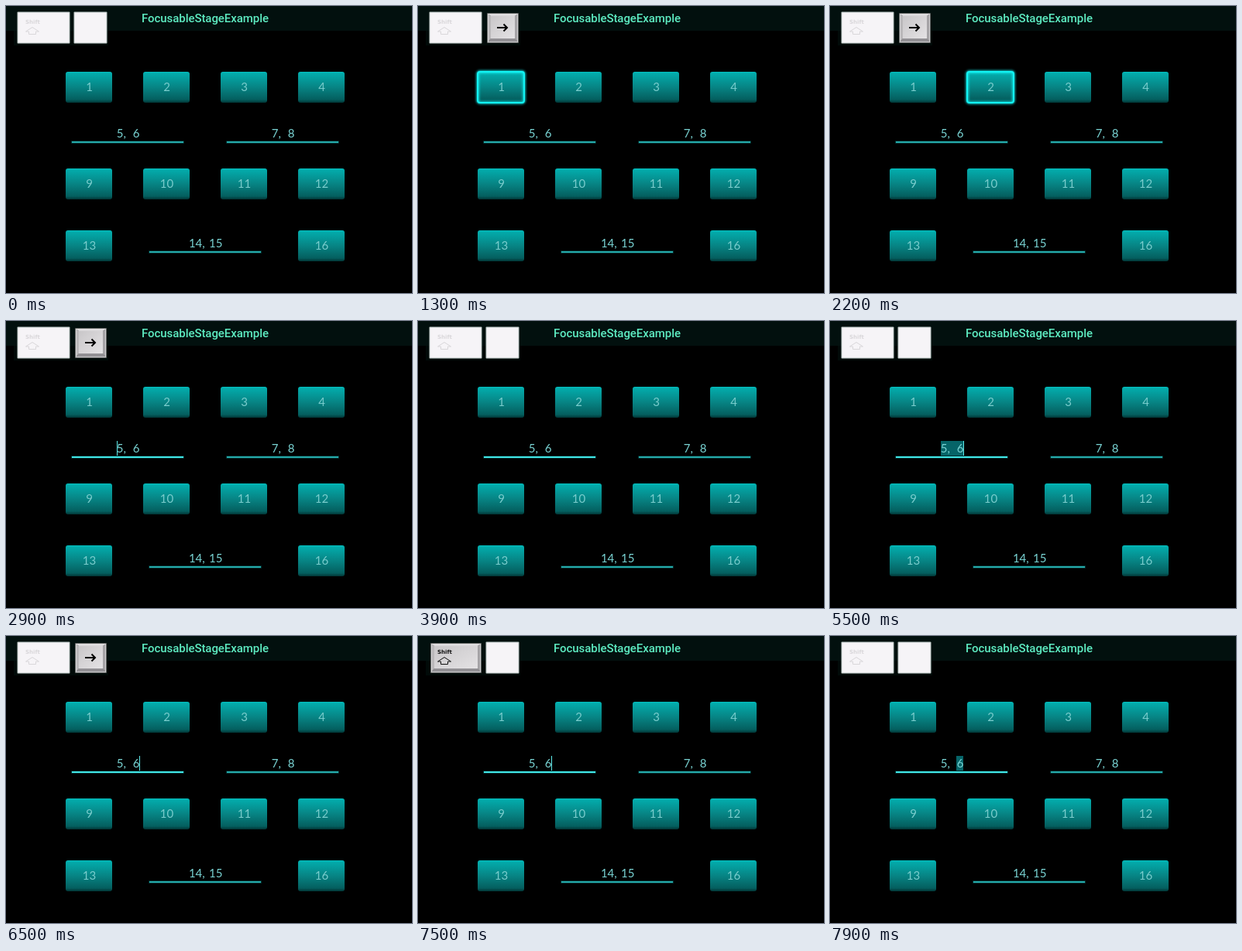
Write an HTML page that moves like this. It is 524 by 371 pixels and loops after 8 s.

```html
<!DOCTYPE html>
<html lang="en">
<head>
<meta charset="utf-8">
<title>FocusableStageExample</title>
<style>
  html, body { margin: 0; width: 100%; height: 100%; overflow: hidden; background: #000; }
  svg { display: block; }
  .title { font: 500 15px Roboto, sans-serif; fill: #5eecc2; }
  .label { font: 15px Lato, sans-serif; text-anchor: middle; }
  .shift { font: bold 7px "DejaVu Sans", sans-serif; }
</style>
</head>
<body>
<svg id="stage" width="524" height="371" viewBox="0 0 524 371">
  <defs>
    <linearGradient id="teal" x2="0" y2="1">
      <stop offset="0" stop-color="#02bcbc"/>
      <stop offset=".07" stop-color="#03a9a9"/>
      <stop offset=".5" stop-color="#078484"/>
      <stop offset=".9" stop-color="#045f5f"/>
      <stop offset="1" stop-color="#013535"/>
    </linearGradient>
    <linearGradient id="face" x2="1" y2="1">
      <stop offset="0" stop-color="#c9c7c9"/>
      <stop offset="1" stop-color="#e4e2e4"/>
    </linearGradient>
    <filter id="blur" x="-20%" y="-20%" width="140%" height="140%">
      <feGaussianBlur stdDeviation="1.8"/>
    </filter>
  </defs>
  <rect width="524" height="371"/>
  <rect width="524" height="32" fill="#02100e"/>
  <rect y="32" x="10" width="122" height="19" fill="#010a08"/>
  <text class="title" x="257" y="21" text-anchor="middle" textLength="164">FocusableStageExample</text>
</svg>
<script>
const LOOP = 8000;
const stage = document.getElementById('stage');

function add(tag, attrs, parent = stage, text = '') {
  const el = document.createElementNS('http://www.w3.org/2000/svg', tag);
  for (const k in attrs) el.setAttribute(k, attrs[k]);
  el.textContent = text;
  return parent.appendChild(el);
}
const show = (el, on) => el.setAttribute('visibility', on ? 'inherit' : 'hidden');

function button(n, x, y) {
  add('rect', { x, y, width: 60, height: 40, rx: 3, fill: 'url(#teal)' });
  const ring = add('g', { fill: 'none', stroke: '#12f4f4' });
  const box = { x, y, width: 60, height: 40, rx: 3 };
  add('rect', { ...box, 'stroke-width': 4, filter: 'url(#blur)', opacity: .75 }, ring);
  add('rect', { ...box, 'stroke-width': 2 }, ring);
  add('text', { class: 'label', x: x + 30.5, y: y + 24.5, fill: '#79cccc' }, stage, n);
  return ring;
}

function field(text, x, y, gap) {
  const mark = add('rect', { y: y - 21, height: 19, fill: '#066468' });
  add('rect', { x: x - 1, y: y - 2, width: 146, height: 4, rx: 1, fill: '#022b2b' });
  const line = add('rect', { x, y: y - 1, width: 144, height: 2 });
  add('text', { class: 'label', x: x + 72.7, y: y - 6.5, fill: '#78d2d2', style: `word-spacing:${gap}px` }, stage, text);
  const caret = add('rect', { y: y - 21, width: 1, height: 19, fill: '#5ceaea' });
  return { mark, line, caret };
}

// A key cap: pale when idle, bevelled grey while held.
function key(x, w) {
  const idle = add('g', {}), held = add('g', {});
  add('rect', { x: x - .5, y: 7.5, width: w + 1, height: 41, rx: 1, fill: '#b9c4c1' }, idle);
  add('rect', { x: x + .5, y: 8.5, width: w - 1, height: 39, fill: '#f6f4f7' }, idle);
  const l = x + 2, r = x + w - 1, t = 10, b = 47;
  add('rect', { x: l - 1, y: t - 1, width: r - l + 2, height: b - t + 2, rx: 1, fill: '#626564' }, held);
  const side = (fill, d) => add('path', { fill, d }, held);
  side('#dddbdd', `M${l} ${t}H${r}L${r - 4} ${t + 3}H${l + 4}z`);
  side('#bab8ba', `M${l} ${t}V${b}L${l + 4} ${b - 5}V${t + 3}z`);
  side('#a5a3a6', `M${r} ${t}V${b}L${r - 4} ${b - 5}V${t + 3}z`);
  side('#929094', `M${l} ${b}H${r}L${r - 4} ${b - 5}H${l + 4}z`);
  add('rect', { x: l + 4, y: t + 3, width: r - l - 8, height: b - t - 8, fill: 'url(#face)' }, held);
  add('rect', { x: l + .5, y: t + .5, width: r - l - 1, height: b - t - 1, fill: 'none', stroke: '#e2e0e2', opacity: .7 }, held);
  return { idle, held, set(on) { show(idle, !on); show(held, on); } };
}

function shiftMark(parent, ink) {
  add('text', { class: 'shift', x: 25, y: 23, fill: ink }, parent, 'Shift');
  add('path', { d: 'M34 27.5L42.5 33H38.5V36.5H29.5V33H25.5z', fill: 'none', stroke: ink }, parent);
}

const shift = key(15, 67), arrow = key(88, 42);
shiftMark(shift.idle, '#d9d7da');
shiftMark(shift.held, '#111');
const glyph = add('path', { d: 'M102 28H115M110.5 23.5L115 28L110.5 32.5', fill: 'none', stroke: '#000', 'stroke-width': 2 }, arrow.held);

const rings = [1, 2, 3, 4].map((n, i) => button(n, 77 + 100 * i, 85));
[9, 10, 11, 12].forEach((n, i) => button(n, 77 + 100 * i, 210));
[13, 16].forEach((n, i) => button(n, 77 + 300 * i, 290));
rings.push(button.last);
const fields = [field('5, 6', 85, 176, 5), field('7, 8', 285, 176, 5), field('14, 15', 185, 318, 1.5)];
rings.pop();
stage.querySelectorAll('g[stroke]').forEach(ring => show(ring, false));
fields.forEach(f => { show(f.mark, false); show(f.caret, false); });

const stops = [143, 152, 156, 163, 172];   // caret places between characters
const within = (t, ...spans) => spans.some(([a, b]) => t >= a && t < b);
const latest = (t, steps) => steps.reduce((v, [at, next]) => t >= at ? next : v, 0);

function draw(t) {
  shift.set(within(t, [4200, 5500], [7500, 7900]));
  arrow.set(within(t, [1300, 1600], [2200, 2400], [2900, 3400], [4300, 5200], [6500, 6700], [7600, 7800]));
  glyph.setAttribute('transform', t >= 7500 ? 'matrix(-1 0 0 1 217 0)' : '');
  show(rings[0], within(t, [1300, 2200]));
  show(rings[1], within(t, [2200, 2900]));

  fields.forEach((f, i) => f.line.setAttribute('fill', i === 0 && t >= 2900 ? '#42e6e6' : '#26aaaa'));
  const { mark, caret } = fields[0];
  const pos = latest(t, [[4300, 1], [4400, 2], [4600, 3], [4900, 4], [7600, 3]]);
  const anchor = t < 6500 ? 0 : 4;
  const from = stops[Math.min(pos, anchor)], to = stops[Math.max(pos, anchor)];
  mark.setAttribute('x', from);
  mark.setAttribute('width', to - from);
  show(mark, to > from);
  caret.setAttribute('x', stops[pos]);
  show(caret, within(t, [2900, 3300], [3600, 3900], [4200, 5200], [5500, 5900], [6200, 6800], [7100, 7800]));
}

const start = performance.now();
function tick() {
  draw((performance.now() - start) % LOOP);
  requestAnimationFrame(tick);
}
draw(0);
tick();
</script>
</body>
</html>
```
